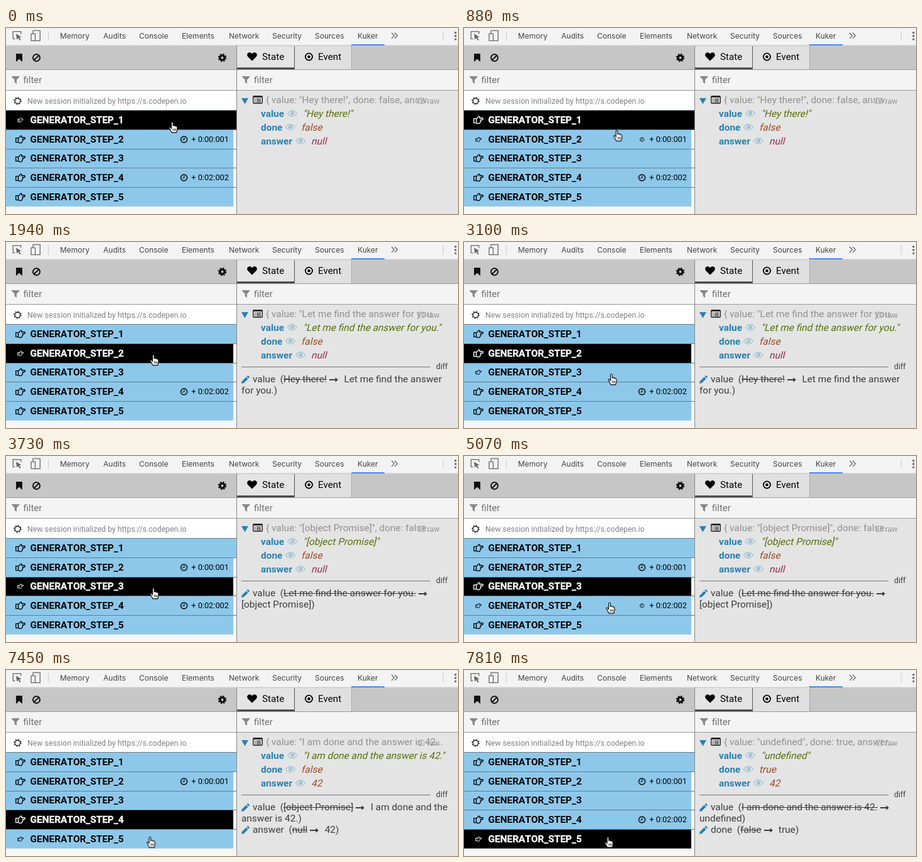
These frames come from a looping animation (720x297 px, 8000 ms). An HTML page:

```html
<!DOCTYPE html>
<html lang="en">
<head>
<meta charset="utf-8">
<title>Generator steps</title>
<style>
html, body { margin: 0; width: 100%; height: 100%; overflow: hidden; background: #f6f6f6; }
#stage { position: relative; width: 720px; height: 297px; overflow: hidden; font: 15.4px Roboto, sans-serif; }
#stage > svg { position: absolute; left: 0; top: 0; }
svg text { font-family: Roboto, sans-serif; white-space: pre; }
.tabs text { font: 12px Inter, sans-serif; fill: #444; }
.line { fill: none; stroke: currentColor; stroke-linejoin: round; stroke-linecap: round; }
.name { font-size: 15.4px; font-weight: 700; font-kerning: none; fill: currentColor; }
.sel .name { stroke: currentColor; stroke-width: .3px; }
.time { font-size: 12.8px; text-anchor: end; }

.row .icon { transform-box: fill-box; transform-origin: center; }
.sel, .icon, #cursor { animation: 8s -5ms infinite step-end; }

.panel { position: absolute; left: 0; top: 0; }
.panel div { position: absolute; white-space: pre; line-height: 20px; color: #3c3c3c; }
.panel .head { left: 414px; top: 105px; color: #909090; }
.panel .prop { left: 406px; }
.panel .rule { left: 375px; top: 199px; width: 301px; height: 1px; background: #777; }
.panel .label { left: 685px; top: 189px; font-size: 12.3px; }
.panel .diff { left: 375px; top: 210px; line-height: 18px; }
.panel b { color: #2a80b0; font-kerning: none; }
/* upright letters slanted, as a synthesized italic */
.panel i { display: inline-block; font-style: normal; transform: skewX(-14deg); transform-origin: 0 15px; }
.panel i.string { color: #586e0c; }
.panel i.null { color: #9b2c4b; }
.panel i.plain { color: #984a26; }
.panel svg { overflow: visible; }
.eye { width: 16px; height: 11px; margin: 0 8.5px 0 5px; color: #9bc0d4; }
.pen { width: 13px; height: 13px; margin-right: 5px; vertical-align: -2px; color: #2a80b0; }
.arrow { width: 14px; height: 10px; margin: 0 9.5px 0 4px; vertical-align: -0.5px; }

@keyframes sel1 { 0% { opacity: 1 } 24.25%, 100% { opacity: 0 } }
@keyframes sel2 { 0% { opacity: 0 } 24.25% { opacity: 1 } 46.625%, 100% { opacity: 0 } }
@keyframes sel3 { 0% { opacity: 0 } 46.625% { opacity: 1 } 71.125%, 100% { opacity: 0 } }
@keyframes sel4 { 0% { opacity: 0 } 71.125% { opacity: 1 } 97.625%, 100% { opacity: 0 } }
@keyframes sel5 { 0% { opacity: 0 } 97.625%, 100% { opacity: 1 } }

@keyframes hover1 { 0% { transform: scale(.6) } 10.95%, 100% { transform: none } }
@keyframes hover2 { 0% { transform: none } 10.95% { transform: scale(.6) } 36.58%, 100% { transform: none } }
@keyframes hover3 { 0% { transform: none } 36.58% { transform: scale(.6) } 62.25%, 100% { transform: none } }
@keyframes hover4 { 0% { transform: none } 62.25% { transform: scale(.6) } 90.93%, 100% { transform: none } }
@keyframes hover5 { 0% { transform: none } 90.93%, 100% { transform: scale(.6) } }

#cursor { margin: -1px; animation-name: move; overflow: visible; }
@keyframes move {
  0% { transform: translate(260px, 150px) }
  1% { transform: translate(260px, 150px); animation-timing-function: steps(2, start) }
  3.25% { transform: translate(244px, 148px) }
  8.75% { transform: translate(244px, 148px); animation-timing-function: steps(7, start) }
  16.475% { transform: translate(231.5px, 184px) }
  19.75% { transform: translate(231.5px, 184px); animation-timing-function: steps(2, start) }
  22% { transform: translate(230px, 180px) }
  35.5% { transform: translate(230px, 180px); animation-timing-function: steps(4, start) }
  39.833% { transform: translate(230px, 211px) }
  61.125% { transform: translate(230px, 211px); animation-timing-function: steps(4, start) }
  65.625% { transform: translate(226px, 242px) }
  88.75% { transform: translate(226px, 242px); animation-timing-function: steps(5, start) }
  94.219%, 100% { transform: translate(224.5px, 266.5px) }
}
</style>
</head>
<body>
<div id="stage">
  <svg width="720" height="297" viewBox="0 0 720 297">
    <defs>
      <path id="hand" class="line" stroke-width="1.35" d="M4.5 4.6H5.2C6.6 4 7.2 2.4 8.3 1.4 9.6.6 10.8 2 9.8 3.7H14.2C15.8 3.7 15.8 6.5 14.2 6.5H11.4C12.4 6.9 12.2 8.6 11.2 8.9 11.6 9.8 11.1 10.7 10.4 10.9 10.4 12 9.7 12.6 8.7 12.6H7.6C6.3 12.6 5.7 11.6 4.5 11.6ZM.7 4.6H4.5V11.6H.7Z"/>
      <g id="clock" class="line" stroke-width="1.5"><circle cx="6" cy="6" r="5"/><path d="M6.3 3.2V6.5H4" stroke-width="1.2"/></g>
      <path id="funnel" d="M0 0H12.5V1L8 5.8V12L4.6 9.5V5.8L0 1Z" fill="#888"/>
      <g id="eye"><path class="line" stroke-width="1.3" d="M.7 5.5C4.5-.7 11.5-.7 15.3 5.5 11.5 11.2 4.5 11.2.7 5.5Z"/><circle cx="8" cy="5" r="3.1" fill="currentColor"/><circle cx="7" cy="4" r="1" fill="#e4e4e4"/></g>
      <path id="pen" fill="currentColor" d="M0 13 .8 9.2 7.6 2.4 10.6 5.4 3.8 12.2ZM8.4 1.6 9.6.4Q10.3-.2 11 .4L12.6 2Q13.2 2.7 12.6 3.4L11.4 4.6Z"/>
      <path id="arrow" fill="currentColor" d="M0 4.1H9.5V1.2L14 5 9.5 8.8V5.9H0Z"/>
    </defs>

    <!-- browser tab strip -->
    <rect width="720" height="28" fill="#f3f3f3"/>
    <g class="line" color="#666" stroke-width="1.3">
      <path d="M14 17.3H11.2V5.7H23.8V9"/>
      <path d="M16 9.3 24.5 14.2 21.2 15 23.6 19 21.8 20 19.5 16 17.2 18.5Z" fill="#666" stroke="none"/>
      <path d="M43 8V4.2H54.3V20.3H47M40 9.2H46.5V20.3H40Z"/>
      <path d="M614.5 8 618.5 12.2 614.5 16.4M619.5 8 623.5 12.2 619.5 16.4"/>
    </g>
    <path d="M67.5 5V20M696.5 5V20" stroke="#ccc"/>
    <g fill="#666"><circle cx="716" cy="7.5" r="1.7"/><circle cx="716" cy="12.8" r="1.7"/><circle cx="716" cy="18.1" r="1.7"/></g>
    <g class="tabs" id="tabs"></g>
    <rect y="27.5" width="720" height="1" fill="#bbb"/>
    <rect x="550" y="26" width="53" height="2" fill="#4285f4"/>

    <!-- toolbars -->
    <rect y="28.5" width="720" height="37.5" fill="#c6c6c6"/>
    <rect x="368" y="29" width="91" height="37" fill="#e4e4e4"/>
    <rect x="460" y="29" width="90" height="37" fill="#e0e0e0"/>
    <path d="M459.5 29V66" stroke="#555"/>
    <path d="M550.5 29V66" stroke="#aaa"/>
    <rect x="368" y="63" width="91" height="3" fill="#4c4c4c"/>
    <path d="M16 41H26V54L21 49.5 16 54Z" fill="#111"/>
    <g class="line" color="#111" stroke-width="2"><circle cx="48.5" cy="47.5" r="5.5"/><path d="M44.7 51.3 52.3 43.7"/></g>
    <g class="line" color="#111"><circle cx="344.5" cy="47.5" r="3.6" stroke-width="3.4"/><circle cx="344.5" cy="47.5" r="5.7" stroke-width="2" stroke-dasharray="2.4 2.077" style="stroke-linecap:butt"/></g>
    <path d="M392 52.5 385.6 46.2C382.7 43 384.6 39 388 39 390 39 391.4 40.4 392 41.4 392.6 40.4 394 39 396 39 399.4 39 401.3 43 398.4 46.2Z" fill="#000"/>
    <circle cx="482.5" cy="46" r="5.6" fill="none" stroke="#000" stroke-width="1.8"/><circle cx="482.5" cy="46" r="2.3"/>
    <g font-size="15.2"><text x="408" y="51">State</text><text x="497" y="51">Event</text></g>

    <!-- filters and panes -->
    <rect y="66" width="720" height="34" fill="#f4f4f4"/>
    <rect y="101" width="367" height="30" fill="#fff"/>
    <rect x="368" y="100" width="352" height="197" fill="#e4e4e4"/>
    <path d="M0 66.5H720M0 99.5H720" stroke="#999"/>
    <use href="#funnel" x="9" y="77"/><use href="#funnel" x="376" y="77"/>
    <g font-size="15" fill="#707070"><text x="27.5" y="88">filter</text><text x="395" y="88">filter</text></g>
    <g class="line" color="#222"><circle cx="18.5" cy="116.5" r="4.3" stroke-width="1.4"/><circle cx="18.5" cy="116.5" r="5.6" stroke-width="1.6" stroke-dasharray="1.6 2.8" style="stroke-linecap:butt"/></g>
    <text x="34" y="121" font-size="12.3" fill="#808080">New session initialized by https://s.codepen.io</text>
    <g id="rows"></g>
    <path d="M367.5 28V297" stroke="#888"/>

    <!-- state tree -->
    <path d="M375 112H386L380.5 121.5Z" fill="#2a80b0"/>
    <rect x="393.7" y="108.7" width="14.6" height="11.6" rx="1.4" fill="none" stroke="#222" stroke-width="1.4"/>
    <path d="M394 109.8H408" stroke="#222" stroke-width="2"/>
    <path d="M396 113H397.5M399 113H406M396 115.4H397.5M399 115.4H406M396 117.8H397.5M399 117.8H406" stroke="#222" stroke-width="1.2"/>
    <rect x="657" y="112" width="9" height="8.5" rx="1" fill="none" stroke="#aaa"/>
    <text x="671" y="121" font-size="12.2" fill="#999">raw</text>
  </svg>
  <div id="panels"></div>
  <svg id="cursor" width="15.4" height="19.8" viewBox="0 0 14 18">
    <path d="M4.5 16.3 1 9.8C.3 8.4 1.8 7.6 2.7 8.7L4 10.2V2.2C4 .4 6.4.4 6.4 2.2V6.2C7 5.4 8.6 5.6 8.7 6.7 9.4 6 10.8 6.4 10.8 7.4 11.6 7 12.6 7.4 12.6 8.6V11.8C12.6 13.7 11.6 14.7 11.5 16.3Z" fill="#fff" stroke="#000"/>
    <path d="M6.6 10.5V13.8M8.5 10.5V13.8M10.4 10.5V13.8" stroke="#000" stroke-width=".8"/>
  </svg>
</div>
<script>
const byId = id => document.getElementById(id);

const tabs = { Memory: 86, Audits: 155, Console: 212, Elements: 280, Network: 355, Security: 424, Sources: 492, Kuker: 560 };
byId('tabs').innerHTML = Object.entries(tabs).map(([name, x]) =>
  `<text x="${x}" y="17">${name}</text>`).join('');

// action list: row edges, each row starting with a 1px rule
const edges = [131, 162, 193, 223, 254, 285];
const times = { 2: '+ 0:00:001', 4: '+ 0:02:002' };

function row(i) {
  const n = i + 1, top = edges[i] + 1, width = i ? 362 : 367;
  const mid = Math.round((edges[i] + edges[n]) / 2) - .5;
  const icon = (id, x, y) =>
    `<g transform="translate(${x} ${y})"><use class="icon" href="#${id}" style="animation-name:hover${n}"/></g>`;
  const face = (fill, ink, extra) => `<g color="${ink}">
    <rect y="${top}" width="${width}" height="${edges[n] - top}" fill="${fill}"/>
    ${icon('hand', 15, mid - 6.5)}
    <text class="name" x="38.5" y="${mid + 5.5}">GENERATOR_STEP_${n}</text>${extra}</g>`;
  const time = times[n]
    ? icon('clock', 277.5, mid - 5.5) + `<text class="time" x="355" y="${mid + 4.5}">${times[n]}</text>` : '';
  return `<g class="row"><rect y="${top - 1}" width="367" height="1" fill="#6c7a82"/>
    ${face('#8dc8eb', '#000', time)}
    <g class="sel" style="animation-name:sel${n}">${face('#000', '#fff', '')}</g></g>`;
}
byId('rows').innerHTML = [0, 1, 2, 3, 4].map(row).join('');

// state snapshots; a line break in a change marks where it wraps
const ask = 'Let me find the answer for you.';
const done = 'I am done and the answer is 42.';
const promise = '[object Promise]';
const states = [
  [{ value: 'Hey there!', done: false, answer: null }],
  [{ value: ask, done: false, answer: null },
    ['value', 'Hey there!', 'Let me find the answer\nfor you.']],
  [{ value: promise, done: false, answer: null },
    ['value', ask, '\n' + promise]],
  [{ value: done, done: false, answer: 42 },
    ['value', promise, 'I am done and the\nanswer is 42.'], ['answer', 'null', '42']],
  [{ value: 'undefined', done: true, answer: 42 },
    ['value', done, '\nundefined'], ['done', 'false', 'true']]
];

const glyph = id => `<svg class="${id}"><use href="#${id}"/></svg>`;
const kind = v => typeof v === 'string' ? 'string' : v === null ? 'null' : 'plain';
const change = ([key, from, to]) =>
  `${glyph('pen')}${key}  (<s>${from}</s>${glyph('arrow')}${to})`;

function panel([state, ...changes], i) {
  const props = Object.entries(state);
  const head = '{ ' + props.map(([k, v]) => `${k}: ${JSON.stringify(v)}`).join(', ') + ' }';
  const list = props.map(([k, v], j) =>
    `<div class="prop" style="top:${127 + 22 * j}px"><b>${k}</b>${glyph('eye')}<i class="${kind(v)}">${JSON.stringify(v)}</i></div>`);
  const diff = changes.length ? `<div class="rule"></div><div class="label">diff</div>
    <div class="diff">${changes.map(change).join('\n')}</div>` : '';
  return `<div class="panel sel" style="animation-name:sel${i + 1}">
    <div class="head">${head.slice(0, 40)}...</div>${list.join('')}${diff}</div>`;
}
byId('panels').innerHTML = states.map(panel).join('');
</script>
</body>
</html>
```
